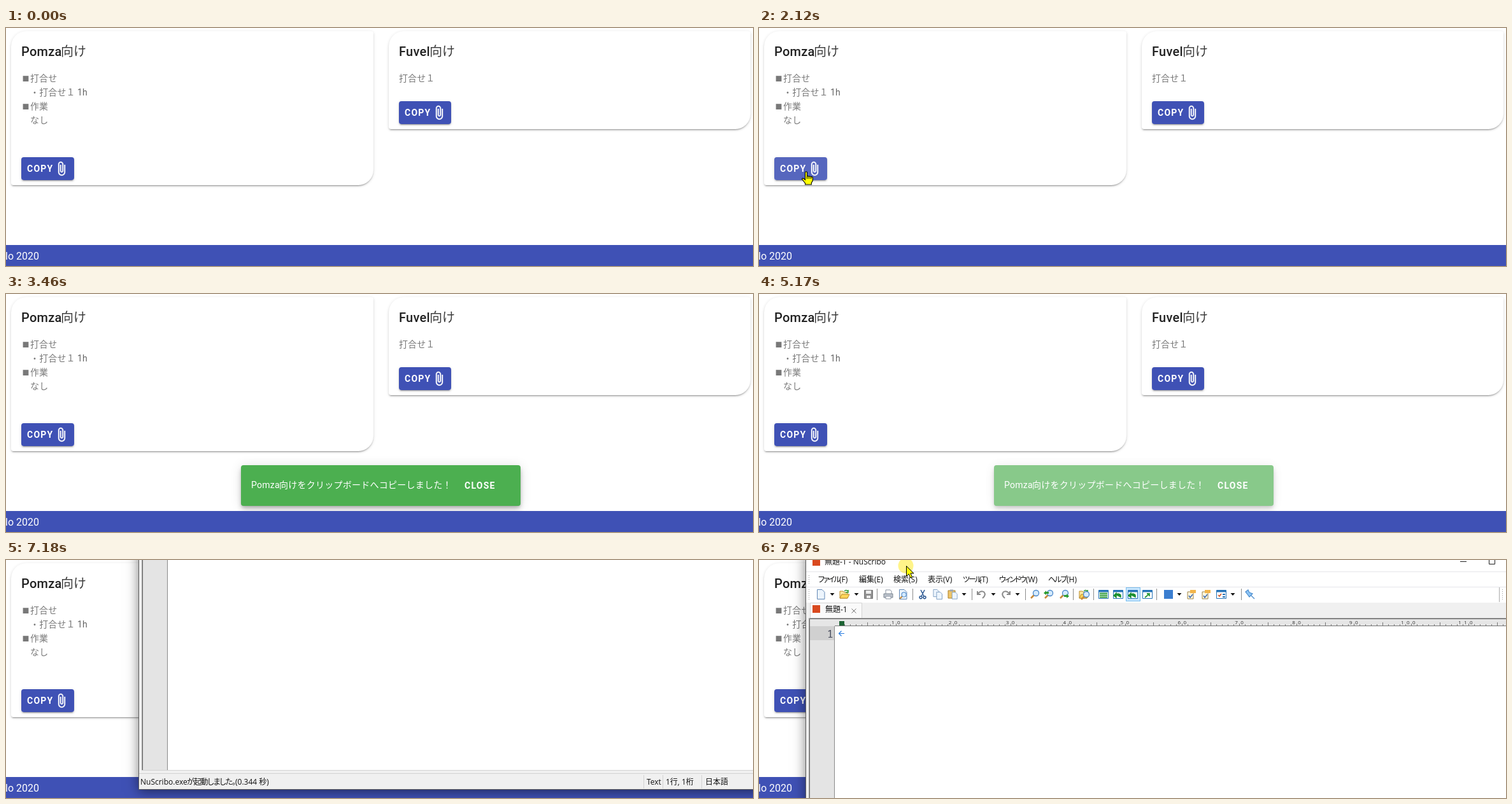
Write an HTML page that moves like this. It is 1173 by 374 pixels and loops after 8 s.

```html
<!DOCTYPE html>
<html lang="ja">
<head>
<meta charset="utf-8">
<title>Copy to clipboard</title>
<style>
html, body { margin: 0; width: 100%; height: 100%; overflow: hidden; background: #fff; }
body { position: relative; font-family: Roboto, 'Noto Sans CJK JP', 'Noto Sans CJK', sans-serif; }
div, span, svg { position: absolute; }
svg { overflow: visible; }
span { white-space: nowrap; }

.card {
  border-radius: 24px 4px; background: #fff;
  box-shadow: 0 3px 1px -2px rgba(0,0,0,.2), 0 2px 2px rgba(0,0,0,.14), 0 1px 5px rgba(0,0,0,.12);
}
.title { left: 16px; top: 16px; font: 500 20px/32px Roboto, 'Noto Sans CJK JP', sans-serif; letter-spacing: .25px; color: rgba(0,0,0,.87); }
.line { left: 16px; font-size: 14px; line-height: 22px; letter-spacing: .1px; color: rgba(0,0,0,.6); }
.jp { font-weight: 300; }
.card .jp { opacity: .88; }
.line i { display: inline-block; width: 14px; font: 11px/20px 'Noto Sans CJK JP', sans-serif; text-align: center; }
.btn {
  left: 16px; width: 83px; height: 36px; border-radius: 4px; background: #3f51b5; overflow: hidden;
}
.lift { left: 16px; width: 83px; height: 36px; border-radius: 4px;
  box-shadow: 0 3px 1px -2px rgba(0,0,0,.2), 0 2px 2px rgba(0,0,0,.14), 0 1px 5px rgba(0,0,0,.12); }
.caps { color: #fff; font-size: 14px; font-weight: 700; line-height: 36px; letter-spacing: 1.25px; }
.btn .caps { left: 9px; top: 0; }
.btn svg { left: 51px; top: 6px; fill: #fff; stroke: #fff; stroke-width: .4; }
.glow { inset: 0; background: #fff; opacity: 0; }

.snack {
  left: 369px; top: 269px; width: 439px; height: 64px; border-radius: 4px; background: #4caf50; opacity: 0;
  box-shadow: 0 3px 5px -1px rgba(0,0,0,.2), 0 6px 10px rgba(0,0,0,.14), 0 1px 18px rgba(0,0,0,.12);
}
.snack .msg { top: 20px; font-size: 14px; line-height: 22px; letter-spacing: .25px; color: #fff; }
.footer { left: 0; top: 341px; width: 100%; height: 33px; background: #3f51b5; }
.footer span { left: -1px; top: 6px; font-size: 16px; line-height: 24px; color: #fff; }

.win { left: 0; top: 0; width: 1173px; height: 374px; visibility: hidden; }
.frame { left: 158px; top: -9px; width: 1147px; height: 560px; background: #fff; box-shadow: 0 3px 18px rgba(0,0,0,.5); }
.win text { font: 12px 'Open Sans', 'Noto Sans CJK JP', sans-serif; fill: #111; }
.win .kana { font-feature-settings: 'palt'; letter-spacing: -2px; }
.win .note { font-feature-settings: 'palt'; letter-spacing: -1.1px; }
.win .num { font: 8px 'Open Sans', sans-serif; fill: #333; }

/* One shared 8 s clock; values hold unless a keyframe sets its own steps. */
.win, .snack, .hover, .mouse, .arrow, .hand, .halo { animation: 8s step-end infinite; }
.mouse { left: 0; top: 0; animation-name: roam; }
.arrow { animation-name: arrow; }
.hand { animation-name: hand; }
.hover { animation-name: hover; }
.snack { animation-name: snack; }
.win { animation-name: drag; }
.halo { animation-name: halo; }

@keyframes roam {
  0% { transform: translate(-99px, -99px); }
  .875% { transform: translate(886px, 349px); animation-timing-function: steps(2); }
  2.875% { transform: translate(610px, 293px); animation-timing-function: steps(2); }
  4.875% { transform: translate(400px, 267px); animation-timing-function: steps(2); }
  6.875% { transform: translate(235px, 250px); animation-timing-function: steps(2); }
  8.75% { transform: translate(144px, 227px); }
  10.875% { transform: translate(130px, 226px); animation-timing-function: steps(4); }
  14.875% { transform: translate(81px, 228px); }
  22.5% { transform: translate(78px, 227px); }
  23.625% { transform: translate(74px, 225px); }
  27.5% { transform: translate(98px, 224px); animation-timing-function: steps(2); }
  29.5% { transform: translate(200px, 222px); animation-timing-function: steps(3); }
  32.5% { transform: translate(390px, 235px); animation-timing-function: steps(3); }
  35.375% { transform: translate(561px, 267px); }
  36.375% { transform: translate(578px, 276px); }
  37.25% { transform: translate(590px, 282px); }
  41.25% { transform: translate(592px, 280px); }
  42.25% { transform: translate(547px, 185px); }
  43.25%, 100% { transform: translate(-99px, -99px); }
}
@keyframes hand {
  0%, 28.5%, 100% { visibility: hidden; }
  12.875% { visibility: visible; }
}
@keyframes arrow {
  0%, 28.5%, 100% { visibility: visible; }
  12.875% { visibility: hidden; }
}
@keyframes hover {
  0%, 28.5%, 100% { opacity: 0; }
  12.875% { opacity: .08; }
  25.5% { opacity: .1; }
  26.5% { opacity: .12; }
}
@keyframes snack {
  0% { opacity: 0; transform: scale(.8); }
  27.5% { opacity: .5; transform: scale(.92); }
  28.5% { opacity: .95; transform: scale(.99); }
  29.5% { opacity: 1; transform: none; }
  64.625% { opacity: .665; transform: none; }
  65.75%, 100% { opacity: 0; transform: none; }
}
@keyframes drag {
  0% { visibility: hidden; opacity: 0; transform: translate(90px, -375px); }
  70.625% { visibility: visible; opacity: .6; transform: translate(90px, -375px); }
  71.5% { visibility: visible; opacity: 1; transform: translate(90px, -375px); }
  85.125% { visibility: visible; opacity: 1; transform: translate(90px, -375px); animation-timing-function: steps(2); }
  87% { visibility: visible; opacity: 1; transform: translate(80px, -320px); animation-timing-function: steps(2); }
  88.875% { visibility: visible; opacity: 1; transform: translate(50px, -190px); animation-timing-function: steps(2); }
  90.75% { visibility: visible; opacity: 1; transform: translate(18px, -66px); animation-timing-function: steps(2); }
  92.625% { visibility: visible; opacity: 1; transform: translate(3px, -8px); }
  93.625% { visibility: visible; opacity: 1; transform: none; }
  95.5% { visibility: visible; opacity: 1; transform: translate(-14px, -1px); animation-timing-function: steps(3); }
  98.375%, 100% { visibility: visible; opacity: 1; transform: translate(-85px, -3px); }
}
@keyframes halo {
  0% { opacity: .75; }
  95.5% { opacity: .7; animation-timing-function: steps(3); }
  98.375%, 100% { opacity: .52; }
}
</style>
</head>
<body>
<svg width="0" height="0">
  <defs>
    <path id="clip" d="M16.5 6v11.5c0 2.21-1.79 4-4 4s-4-1.79-4-4V5c0-1.38 1.12-2.5 2.5-2.5s2.5 1.12 2.5 2.5v10.5c0 .55-.45 1-1 1s-1-.45-1-1V6H10v9.5c0 1.38 1.12 2.5 2.5 2.5s2.5-1.12 2.5-2.5V5c0-2.21-1.79-4-4-4S7 2.79 7 5v12.5c0 3.04 2.46 5.5 5.5 5.5s5.5-2.46 5.5-5.5V6h-1.5z"/>
    <path id="pointer" d="M.5 .5V16.5L4.2 13 6.8 19 9.5 17.8 7 12H12z" fill="#ff0" stroke="#000"/>
    <path id="finger" d="M-1.5 1.5q1.5-1.5 3 0V8q1.5-1 3 .3 1.5-.8 3 .5 1.7-.5 2.8 1V15l-2 3.5V21H-1.5V19L-6.5 12.5q.5-2 2.5-1L-1.5 13.5zM1.5 8v4M4.5 8.3v3.7M7.5 9v3" fill="#ff0" stroke="#000" stroke-width="1.1"/>

    <path id="tri" d="M-3.5-2h7L0 2z" fill="#111"/>
    <path id="sep" d="M0-9V9" stroke="#8c8c8c"/>
    <path id="page" d="M-5.5-7.5H2l4 4V7.5H-5.5z" fill="#edf5fd" stroke="#6288b5"/>
    <g id="open">
      <path d="M-7 6V-5h5l2 2h5V6z" fill="#ffe9a0" stroke="#b98a28"/>
      <path d="M-7 6l3-6H8L5 6z" fill="#ffd659" stroke="#b98a28"/>
      <path d="M0-5q3-3 5 0M6-7v4H2" fill="none" stroke="#2d9a34" stroke-width="1.5"/>
    </g>
    <g id="save">
      <path d="M-6.5-6.5h13v13h-13z" fill="#909090" stroke="#777"/>
      <path d="M-4-6h8v5h-8zM-3 2h6v4h-6z" fill="#eee"/>
    </g>
    <g id="print">
      <path d="M-4-1V-7H3l2 2v4" fill="#fff" stroke="#8a94a3"/>
      <path d="M-7-1H7V5H-7z" fill="#bcc3cc" stroke="#7b8490"/>
      <path d="M-4 3h8v4h-8z" fill="#fff" stroke="#8a94a3"/>
    </g>
    <g id="lens">
      <path d="M-6 6L-1 1" stroke="#c98a3a" stroke-width="2.6"/>
      <circle cx="2" cy="-2" r="4.5" fill="#d5ebff" stroke="#4a86c8" stroke-width="1.3"/>
    </g>
    <g id="preview"><use href="#page"/><use href="#lens" transform="translate(0 2) scale(.8)"/></g>
    <path id="cut" d="M-3-7L2 3M3-7L-2 3M-2 3a2 2 0 1 1-2 0zM2 3a2 2 0 1 0 2 0z" fill="none" stroke="#27548f" stroke-width="1.5"/>
    <g id="copy"><use href="#page" transform="translate(-2 -2) scale(.75)"/><use href="#page" transform="translate(3 2) scale(.75)"/></g>
    <g id="paste">
      <path d="M-7-6H4V6H-7z" fill="#f0c568" stroke="#a9812f"/>
      <path d="M-4-7.5h5v3h-5z" fill="#9aa4ae"/>
      <use href="#page" transform="translate(3 2) scale(.7)"/>
    </g>
    <path id="undo" d="M-6-5V0H-1M-5.5-1Q0-7 4.5-3.5 8 1 2 6" fill="none" stroke="#8b8b8b" stroke-width="2"/>
    <use id="redo" href="#undo" transform="scale(-1 1)"/>
    <g id="prev"><use href="#lens"/><path d="M-8-2l4-4v2h4v3h-4v2z" fill="#2e9d32"/></g>
    <g id="next"><use href="#lens"/><path d="M8 3L4-1v2H0v3h4v2z" fill="#2e9d32"/></g>
    <g id="files"><use href="#open"/><use href="#lens" transform="translate(2 2)"/></g>
    <g id="pane">
      <path d="M-7.5-6.5h15v13h-15z" fill="#fff" stroke="#2674b8"/>
      <path d="M-7-5H7" stroke="#2674b8" stroke-width="3"/>
    </g>
    <g id="rows"><use href="#pane"/><path d="M-6-1.5H6M-6 1.5H6M-6 4.5H6" stroke="#2c9a38" stroke-width="1.8"/></g>
    <g id="wrap"><use href="#pane"/><path d="M-4 1Q0-3 4 1v4M-7 2l4-4v7z" fill="#1c9030" stroke="#1c9030" stroke-width="1.4"/></g>
    <g id="jump"><use href="#pane"/><path d="M-4 5L2 0M-1-1h4v4" fill="none" stroke="#2c9a38" stroke-width="1.8"/></g>
    <path id="web" d="M-7-7H7V7H-7z" fill="#3b7ed0"/>
    <g id="props">
      <path d="M-6-4H3V7H-6z" fill="#fff7df" stroke="#9d8448"/>
      <path d="M-2-7H7V-2H-2z" fill="#f3b54a"/>
      <path d="M-4 2l2 3 4-5" fill="none" stroke="#3a68b0" stroke-width="1.5"/>
    </g>
    <g id="tools"><use href="#pane"/><path d="M-5 1l2 2 3-4" fill="none" stroke="#d2592b" stroke-width="1.6"/><path d="M2 0h4M2 4h4" stroke="#2674b8" stroke-width="2"/></g>
    <path id="pin" d="M-7-4l4-3 2 4 5 2-5 5-3-4zM2 2l5 5" fill="#8cc4f5" stroke="#4b8ccd" stroke-width="1.2"/>
  </defs>
</svg>

<div class="card" style="left:8px;top:5px;width:569px;height:242px">
  <span class="title">Pomza</span><span class="title jp" style="left:78px;letter-spacing:0">向け</span>
  <span class="line jp" style="top:63px"><i>■</i>打合せ</span>
  <span class="line jp" style="top:85px">　・打合せ１</span><span class="line" style="left:104px;top:85px">1h</span>
  <span class="line jp" style="top:107px"><i>■</i>作業</span>
  <span class="line jp" style="top:129px">　なし</span>
  <div class="lift" style="top:198px"></div>
  <div class="btn" style="top:198px">
    <div class="glow hover"></div><span class="caps">COPY</span>
    <svg width="24" height="24"><use href="#clip"/></svg>
  </div>
</div>

<div class="card" style="left:601px;top:5px;width:568px;height:154px">
  <span class="title">Fuvel</span><span class="title jp" style="left:64px;letter-spacing:0">向け</span>
  <span class="line jp" style="top:63px">打合せ１</span>
  <div class="lift" style="top:110px;width:82px"></div>
  <div class="btn" style="top:110px;width:82px">
    <span class="caps">COPY</span>
    <svg width="24" height="24"><use href="#clip"/></svg>
  </div>
</div>

<div class="snack">
  <span class="msg" style="left:16px">Pomza</span>
  <span class="msg jp" style="left:60px">向けをクリップボードへコピーしました！</span>
  <span class="caps" style="left:351px;top:14px">CLOSE</span>
</div>

<div class="footer"><span>lo 2020</span></div>

<div class="win">
  <div class="frame"></div>
  <svg width="1173" height="374">
    <path d="M158 21.5H1305M158 45.5H1305" stroke="#e6e6ea"/>
    <rect x="159" y="70" width="1146" height="25" fill="#f0f0f0"/>
    <path d="M165.5 94V70.5H246.5V94" fill="#fafafa" stroke="#d4d4d4"/>
    <path d="M163.5 27V42M163.5 49V66M1252.5 49V66" stroke="#999" stroke-dasharray="1 2"/>
    <path d="M1247.5 46V69" stroke="#aaa"/>
    <rect x="169" y="0" width="12" height="12" fill="#d9491f"/>
    <rect x="169" y="74" width="12" height="12" fill="#d9491f"/>
    <text x="188" y="10">無題-1 - NuScribo</text>
    <text x="189" y="85">無題-1</text>
    <path d="M230.5 79.5l7 7m0-7l-7 7" stroke="#777"/>
    <path d="M1186 5.5h10M1231.5 .5h9v9h-9z" fill="none" stroke="#222"/>
    <g id="menu"></g>
    <rect x="661.5" y="46.5" width="22" height="21" fill="#cce8ff" stroke="#78bdee"/>
    <g id="bar"></g>

    <rect x="159" y="95" width="4" height="431" fill="#f0f0f0"/>
    <rect x="164" y="96" width="1136" height="11" fill="#e6e6e6"/>
    <rect x="164" y="107" width="39" height="413" fill="#e4e4e4"/>
    <rect x="164" y="107" width="39" height="22" fill="#d0d0d0"/>
    <path d="M163.5 520V94.5H1300" fill="none" stroke="#a0a0a0"/>
    <path d="M164.5 520V95.5H1300" fill="none" stroke="#696969"/>
    <path d="M203.5 107V520" stroke="#8a8a8a"/>
    <path d="M204 106.5H1300" stroke="#777"/>
    <g id="ruler"></g>
    <rect x="211" y="99" width="8" height="7" fill="#1d6434"/>
    <text x="192" y="125" style="font:16px 'Noto Sans Mono',monospace;fill:#44495a">1</text>
    <path d="M219 118.5H210.5M214.5 114.5l-4 4 4 4" fill="none" stroke="#2a7de0" stroke-width="1.2"/>

    <rect x="159" y="521" width="1146" height="29" fill="#f0f0f0"/>
    <path d="M163 520.5H1300M159 525.5H1305" stroke="#d2d2d2"/>
    <path d="M951.5 528V549M981.5 528V549M1042.5 528V549" stroke="#d2d2d2"/>
    <text x="161" y="543">NuScribo.exe</text>
    <text x="234" y="543" class="note">が起動しました。</text>
    <text x="310" y="543">(0.344 秒)</text>
    <text x="956" y="543">Text</text>
    <text x="986" y="543">1行, 1桁</text>
    <text x="1048" y="543">日本語</text>
    <rect x="158.5" y="-8.5" width="1146" height="559" fill="none" stroke="#5c5c5c"/>

    <circle class="halo" cx="315.5" cy="12" r="12" fill="#ffe91c"/>
    <use href="#pointer" x="316" y="12"/>
  </svg>
</div>

<div class="mouse">
  <svg class="arrow" width="14" height="21"><use href="#pointer"/></svg>
  <svg class="hand" width="20" height="24"><use href="#finger"/></svg>
</div>

<script>
const fill = (id, parts) => { document.getElementById(id).innerHTML = parts.join(''); };

const menu = [[178, 'ファイル', 'F', 211], [242, '編集', 'E', 266], [296, '検索', 'S', 320], [350, '表示', 'V', 374],
  [405, 'ツール', 'T', 431], [462, 'ウィンドウ', 'W', 504], [539, 'ヘルプ', 'H', 568]];
fill('menu', menu.map(([x, word, key, keyX]) =>
  `<text x="${x}" y="38"${word.length > 2 ? ' class="kana"' : ''}>${word}</text><text x="${keyX}" y="38">(${key})</text>`));

const icons = {
  page: [182], tri: [200, 238, 407, 453, 491, 745, 829], open: [219], save: [257], print: [288], preview: [311],
  sep: [270.5, 326.5, 419.5, 503.5, 578.5, 610.5, 709.5, 842.5], cut: [342], copy: [365], paste: [389],
  undo: [434], redo: [473], lens: [518], prev: [540], next: [564], files: [595], rows: [626],
  wrap: [649, 672], jump: [695], web: [728], props: [764, 787], tools: [811], pin: [856]
};
fill('bar', Object.entries(icons).flatMap(([id, xs]) =>
  xs.map(x => `<g transform="translate(${x} 57)"><use href="#${id}"/></g>`)));

const ruler = [];
for (let col = 1; col <= 120; col++) {
  const x = 210 + col * 8.99;
  const top = col % 10 === 0 ? 103 : col % 5 === 0 ? 101 : 104;
  ruler.push(`<path d="M${Math.round(x) + .5} ${top}V106" stroke="#777"/>`);
  if (col % 10 === 0) {
    const digits = String(col);
    [...digits].forEach((d, i) => {
      ruler.push(`<text class="num" x="${x + 2 - 9 * (digits.length - 1 - i)}" y="104">${d}</text>`);
    });
  }
}
fill('ruler', ruler);
</script>
</body>
</html>
```
